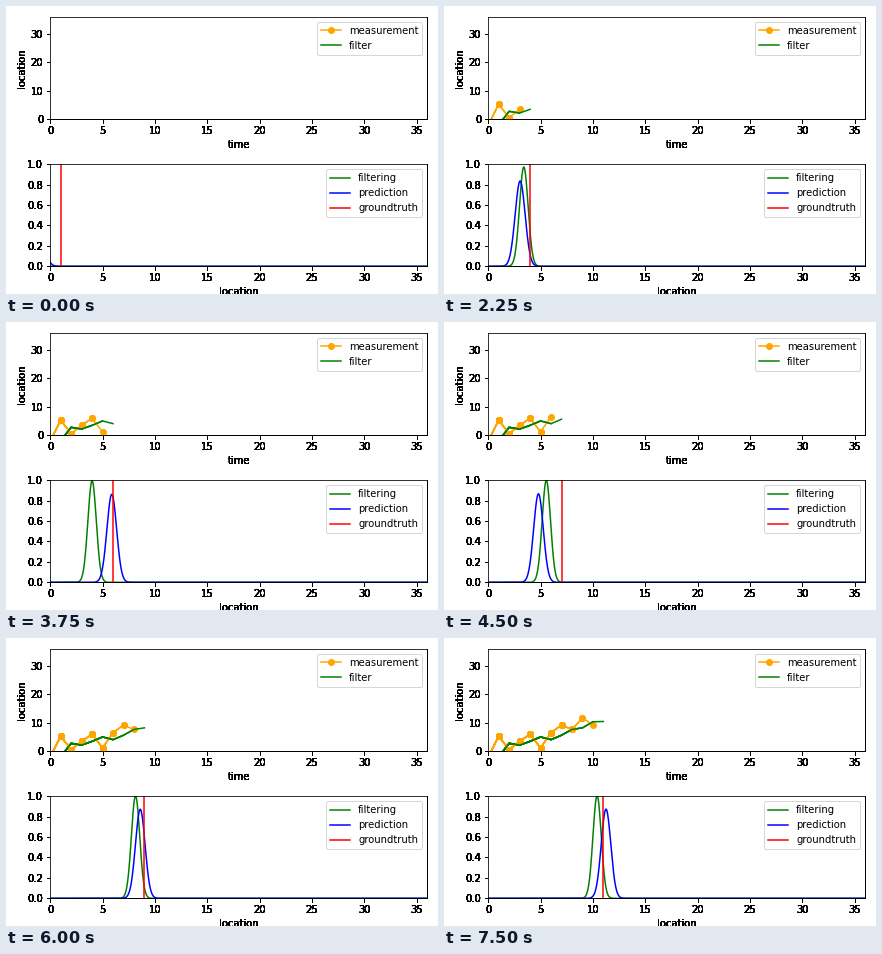
These frames come from a looping animation (432x288 px, 8000 ms). A matplotlib script:

```python
import numpy as np
import matplotlib.pyplot as plt
from matplotlib.animation import FuncAnimation

W, H, DPI = 432, 288, 72
SPAN = 36
STEP_MS, TICK_MS, LOOP_MS = 750, 250, 8000
LEFT, RIGHT, PANEL_H = 44.2, 421.2, 102.2

plt.rcParams.update({"font.family": "DejaVu Sans", "font.size": 10})

# One value per time step
measured = np.array([-2.2, 5.2, 0.5, 3.4, 5.9, 1.1, 6.5, 9.1, 7.6, 11.6, 9.3])
filtered = np.array([-2.0, 2.7, 2.1, 3.4, 4.95, 4.0, 5.55, 7.6, 8.15, 10.3, 10.4])
predicted = np.array([-1.4, -1.1, 3.58, 3.05, 4.3, 5.88, 4.8, 6.55, 8.6, 9.1, 11.25])
steps = np.arange(len(measured))


def variances(n, start=0.345, noise=0.051, info=1.55):
    """Predicted and updated variance of a scalar Kalman filter."""
    prior, pairs = start, []
    for _ in range(n):
        post = 1 / (1 / prior + info)
        pairs.append((prior, post))
        prior = post + noise
    return np.array(pairs).T


prior_var, post_var = variances(len(measured))
grid = np.linspace(0, SPAN, 1440)


def density(mean, var):
    return np.exp(-(grid - mean) ** 2 / (2 * var)) / np.sqrt(2 * np.pi * var)


fig = plt.figure(figsize=(W / DPI, H / DPI), dpi=DPI, facecolor="white")


def panel(top, ymax, yticks, xlabel, ylabel=""):
    # Stacked axes give the heavy, overprinted labels
    for i in range(10):
        ax = fig.add_axes([LEFT / W, 1 - (top + PANEL_H) / H,
                           (RIGHT - LEFT) / W, PANEL_H / H], label=f"{xlabel}{i}")
        ax.set(xlim=(0, SPAN), ylim=(0, ymax), xlabel=xlabel, ylabel=ylabel)
        ax.set_xticks(range(0, SPAN, 5))
        ax.set_yticks(yticks)
    return ax


track = panel(10.8, SPAN, range(0, 31, 10), "time", "location")
belief = panel(158.1, 1, np.linspace(0, 1, 6), "location")

# Each step draws the whole history again, so older segments grow heavier
history = []
for n in steps + 1:
    history.append(track.plot(steps[:n], measured[:n], "o-", color="orange")
                   + track.plot(steps[:n] + 1, filtered[:n], color="green"))
track.legend(history[0], ["measurement", "filter"], loc="upper right")

post_line, = belief.plot([], [], color="green", label="filtering")
prior_line, = belief.plot([], [], color="blue", label="prediction")
truth_line, = belief.plot([], [], color="red", label="groundtruth")
belief.legend(loc="upper right")


def update(i):
    k = i * TICK_MS // STEP_MS
    for n, lines in enumerate(history):
        for line in lines:
            line.set_visible(n <= k)
    post_line.set_data(grid, density(filtered[k], post_var[k]))
    prior_line.set_data(grid, density(predicted[k], prior_var[k]))
    truth_line.set_data([k + 1, k + 1], [0, 1])


anim = FuncAnimation(fig, update, frames=LOOP_MS // TICK_MS, interval=TICK_MS,
                     repeat=True, repeat_delay=0, blit=False)
plt.show()
```
